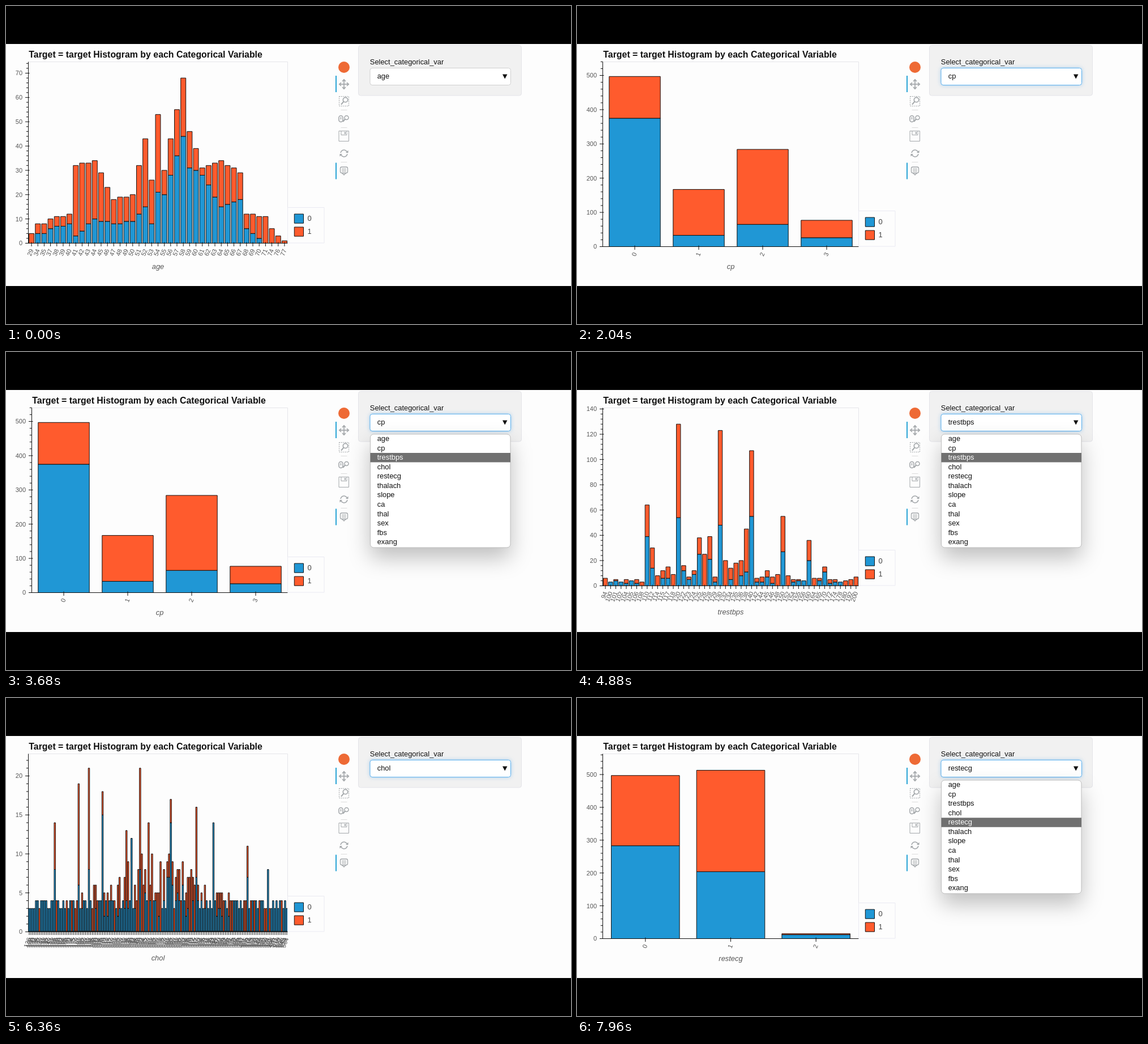
Write an HTML page with a canvas that moves like this. It is 998x561 px and loops after 8000 ms.

```html
<!DOCTYPE html>
<html lang="en">
<head>
<meta charset="utf-8">
<title>Categorical histogram</title>
<style>
html, body { margin: 0; width: 100%; height: 100%; overflow: hidden; background: #000; }
canvas { display: block; }
</style>
</head>
<body>
<canvas id="stage" width="998" height="561"></canvas>
<script>
const ctx = document.getElementById('stage').getContext('2d');
const FONT = '"Liberation Sans", Arial, sans-serif';
const BLUE = '#2097d5', ORANGE = '#ff5b2d', ICON = '#a3a7aa';
const LOOP = 8000, RIGHT = 497.5, TOP = 98.5;
const OPTIONS = ['age', 'cp', 'trestbps', 'chol', 'restecg', 'thalach', 'slope', 'ca', 'thal', 'sex', 'fbs', 'exang'];

// [start ms, charted variable, highlighted option while the menu is open]
const TIMELINE = [
  [0, 'age'], [1080, 'age', 'age'], [1640, 'age', 'cp'], [1840, 'age'],
  [2040, 'cp'], [2640, 'cp', 'cp'], [3440, 'cp', 'trestbps'], [4000, 'cp'],
  [4080, 'trestbps'], [4800, 'trestbps', 'trestbps'], [5360, 'trestbps', 'chol'], [5640, 'trestbps'],
  [5800, 'chol'], [6440, 'chol', 'chol'], [6880, 'chol', 'restecg'], [7200, 'chol'],
  [7360, 'restecg'], [7840, 'restecg', 'restecg']
];
const FOCUS_AT = 1080;

const range = (from, to) => Array.from({ length: to - from + 1 }, (_, i) => from + i);
const random = n => { const v = Math.sin(n * 12.9898 + 4) * 43758.5453; return v - Math.floor(v); };
const bell = (x, center, width) => Math.exp(-(((x - center) / width) ** 2));

// Straight lines through key points [x, total, zeros].
function interpolate(keys, x) {
  const next = Math.max(1, keys.findIndex(key => key[0] >= x));
  const a = keys[next - 1], b = keys[next], share = (x - a[0]) / (b[0] - a[0]);
  return [1, 2].map(k => Math.round(a[k] + (b[k] - a[k]) * share));
}

// Tall bars [x, total, zeros] standing above a seeded floor of the given height.
function scatter(peaks, x, height) {
  const peak = peaks.find(p => p[0] === x);
  if (peak) return peak.slice(1);
  const total = 3 + Math.round(height * random(x)), split = random(x + 500);
  const zeros = split < 0.35 ? 0 : total < 5 ? total : Math.round(total * split * 0.8);
  return [total, zeros];
}

function ageChart() {
  const keys = [[29, 4, 0], [40, 12, 8], [41, 32, 3], [44, 34, 10], [47, 18, 8], [50, 20, 9], [52, 43, 15],
    [53, 26, 8], [54, 53, 21], [55, 30, 20], [58, 68, 44], [59, 46, 31], [61, 31, 28], [64, 34, 15],
    [67, 29, 18], [68, 12, 6], [71, 11, 0], [77, 1, 0]];
  const labels = [29, 34, 35, ...range(37, 71), 74, 76, 77];
  return { left: 39.5, base: 418, unit: 300 / 70, major: 10, minor: 2, labels,
    bars: labels.map(age => interpolate(keys, age)) };
}

function pressureChart() {
  const irregular = [101, 116, 117, 123, 129, 158, 162, 166, 168, 175, 176];
  const peaks = [[110, 64, 39], [112, 30, 14], [120, 128, 54], [125, 38, 25], [128, 39, 21], [130, 123, 48],
    [138, 45, 11], [140, 107, 55], [150, 55, 27], [160, 36, 20], [170, 15, 11]];
  const regular = n => n % 2 === 0 || n % 5 === 0;
  const labels = [94, ...range(100, 180).filter(n => regular(n) !== irregular.includes(n)), 192, 200];
  return { left: 45.5, base: 412, unit: 312 / 140, major: 20, minor: 4, labels,
    bars: labels.map(n => scatter(peaks, n, 4 + 18 * bell(n, 128, 16))) };
}

function cholesterolChart() {
  const peaks = [[15, 14, 8], [29, 19, 6], [35, 21, 8], [43, 18, 15], [57, 13, 4], [60, 12, 12], [65, 21, 8],
    [70, 14, 0], [83, 17, 14], [98, 16, 7], [108, 14, 14], [128, 11, 7], [140, 8, 8]];
  const indices = range(0, 151);
  return { left: 39.5, base: 412, unit: 13.75, major: 5, minor: 1,
    labels: indices.map(i => Math.round(126 + i * 1.9 + (i / 151) ** 8 * 151)),
    bars: indices.map(i => scatter(peaks, i, 0.6 + 7 * bell(i, 73, 48) ** 2)) };
}

const charts = {
  age: ageChart(),
  cp: { left: 45.5, base: 424, unit: 0.604, major: 100, minor: 20,
    labels: range(0, 3), bars: [[497, 375], [167, 33], [284, 65], [77, 26]] },
  trestbps: pressureChart(),
  chol: cholesterolChart(),
  restecg: { left: 45.5, base: 424, unit: 0.579, major: 100, minor: 20,
    labels: range(0, 2), bars: [[497, 283], [513, 204], [15, 12]] }
};

function text(string, x, y, size, { color = '#111', align = 'left', style = '', angle = 0 } = {}) {
  ctx.save();
  ctx.translate(x, y);
  ctx.rotate(angle);
  ctx.font = `${style} ${size}px ${FONT}`;
  ctx.fillStyle = color;
  ctx.textAlign = align;
  ctx.fillText(string, 0, size * 0.36);
  ctx.restore();
}

function line(color, width, ...points) {
  ctx.beginPath();
  points.forEach(([x, y]) => ctx.lineTo(x, y));
  ctx.strokeStyle = color;
  ctx.lineWidth = width;
  ctx.stroke();
}

function box(x, y, w, h, fill, stroke, radius = 0) {
  ctx.beginPath();
  ctx.roundRect(x, y, w, h, radius);
  if (fill) { ctx.fillStyle = fill; ctx.fill(); }
  if (stroke) { ctx.strokeStyle = stroke; ctx.lineWidth = 1; ctx.stroke(); }
}

function shadowed(color, blur, offsetY, draw) {
  ctx.save();
  ctx.shadowColor = color;
  ctx.shadowBlur = blur;
  ctx.shadowOffsetY = offsetY;
  draw();
  ctx.restore();
}

function drawChart(name) {
  const { left, base, unit, major, minor, labels, bars } = charts[name];
  const floor = base + 0.5, pitch = (RIGHT - left) / labels.length, barWidth = pitch * 0.8;
  const yOf = value => floor - value * unit;

  line('#e6e6ea', 1, [left, TOP], [RIGHT, TOP], [RIGHT, floor]);
  text('Target = target Histogram by each Categorical Variable', left + 0.8, 85.5, 15.9, { style: 'bold' });

  bars.forEach(([total, zeros], i) => {
    const center = left + (i + 0.5) * pitch, x = center - barWidth / 2;
    const bar = (from, to, fill) => to > from && box(x, yOf(to), barWidth, (to - from) * unit, fill, '#111');
    bar(0, zeros, BLUE);
    bar(zeros, total, ORANGE);
    line('#111', 1, [center, floor - 2], [center, floor + 5.5]);
    text(labels[i], center, floor + 10.5, 11, { color: '#555', align: 'right', angle: -1.2 });
  });

  line('#111', 1, [left, TOP], [left, floor], [RIGHT, floor]);
  for (let value = 0; yOf(value) >= TOP - 0.5; value += minor) {
    const isMajor = value % major === 0, y = yOf(value);
    line('#111', 1, [left - (isMajor ? 5.5 : 3.7), y], [left + (isMajor ? 2 : 0), y]);
    if (isMajor) text(value, left - 10.5, y, 11, { color: '#555', align: 'right' });
  }
  text(name, (left + RIGHT) / 2, base < 415 ? 458 : 459.5, 12.9, { color: '#555', align: 'center', style: 'italic' });

  box(RIGHT, base - 62.5, 64.5, 62.5, null, '#eaeaf2');
  [BLUE, ORANGE].forEach((color, i) => {
    const y = base - 51 + i * 23;
    box(509.3, y, 16.2, 16.2, color, '#111');
    text(i, 532.5, y + 7, 12.9, { color: '#444' });
  });
}

function magnifier(x, y, r) {
  ctx.beginPath();
  ctx.arc(x, y, r, 0, 7);
  ctx.stroke();
  line(ICON, 2, [x - r * 0.7, y + r * 0.7], [x - r * 1.8, y + r * 2]);
}

function drawToolbar() {
  ctx.fillStyle = '#ee6a35';
  ctx.beginPath();
  ctx.arc(597, 108, 10, 0, 7);
  ctx.fill();
  for (const y of [123, 276.5]) box(582, y, 2, 29, '#29a5d6');
  for (const y of [183.5, 214.5, 275.5]) line('#dcdcdc', 1, [591.5, y], [602.5, y]);

  // pan
  ctx.save();
  ctx.translate(597, 138);
  for (let i = 0; i < 4; i++) {
    line(ICON, 1.7, [0, 0], [0, -8]);
    line(ICON, 1.7, [-3, -5], [0, -8.2], [3, -5]);
    ctx.rotate(Math.PI / 2);
  }
  ctx.restore();

  // box zoom
  ctx.setLineDash([2, 1.5]);
  box(588.5, 159.5, 17, 17, null, ICON);
  ctx.setLineDash([]);
  ctx.lineWidth = 1.7;
  magnifier(599.5, 165.5, 4.2);

  // wheel zoom
  ctx.lineWidth = 1.6;
  ctx.beginPath();
  ctx.roundRect(588, 193.5, 7, 11, 3.5);
  ctx.stroke();
  line(ICON, 1.5, [591.5, 196], [591.5, 200]);
  magnifier(601.5, 197, 3.5);

  // save
  box(588, 220.5, 17.5, 18, null, ICON);
  box(592, 220.5, 10, 7, null, ICON);
  box(598, 222, 2, 4, ICON);

  // reset
  for (const turn of [0, Math.PI]) {
    ctx.save();
    ctx.translate(597, 260);
    ctx.rotate(turn);
    ctx.lineWidth = 1.6;
    ctx.beginPath();
    ctx.arc(0, 0, 6, Math.PI * 1.05, Math.PI * 1.85);
    ctx.stroke();
    ctx.fillStyle = ICON;
    ctx.beginPath();
    ctx.moveTo(7.5, -5.5);
    ctx.lineTo(7.5, -1);
    ctx.lineTo(3, -1);
    ctx.fill();
    ctx.restore();
  }

  // hover
  ctx.lineWidth = 1.3;
  ctx.beginPath();
  ctx.roundRect(590.5, 284, 13, 10.5, 2.5);
  ctx.stroke();
  for (const y of [287, 289.3, 291.6]) line(ICON, 0.9, [593, y], [601, y]);
  line(ICON, 1.5, [593.5, 294.5], [597, 298], [600.5, 294.5]);
}

function drawSelect(value, focused) {
  const field = [643, 109.5, 248.5, 30];
  box(622.5, 69.5, 288, 88.5, '#f1f1f1', '#e4e4e9', 4);
  text('Select_categorical_var', 642.8, 98.5, 12.9);
  if (focused) shadowed('rgba(102,175,233,.6)', 7, 0, () => box(...field, '#fff', null, 4));
  box(...field, '#fff', focused ? '#5cb0ee' : '#cfcfcf', 4);
  text(value, 655.7, 123.5, 12.9);
  ctx.fillStyle = '#111';
  ctx.beginPath();
  ctx.moveTo(877, 120.5);
  ctx.lineTo(885.5, 120.5);
  ctx.lineTo(881.2, 128.5);
  ctx.fill();
}

function drawMenu(highlighted) {
  const rowHeight = 16.59, frame = [643.5, 145, 247.5, 200];
  shadowed('rgba(0,0,0,.25)', 38, 18, () => box(...frame, '#fff', null, 6));
  box(...frame, '#fff', '#bdbdbd', 6);
  OPTIONS.forEach((option, i) => {
    const top = 144.8 + i * rowHeight, active = option === highlighted;
    if (active) box(643.5, top, 247.5, rowHeight, '#707070');
    text(option, 655.7, top + 7.5, 12.9, { color: active ? '#fff' : '#111' });
  });
}

function render(now) {
  const time = now % LOOP;
  const [, variable, highlighted] = TIMELINE.filter(([start]) => start <= time).pop();
  box(0, 0, 998, 561, '#000');
  box(0, 67, 998, 427, '#fdfdfd');
  drawChart(variable);
  drawToolbar();
  drawSelect(variable, time >= FOCUS_AT);
  if (highlighted) drawMenu(highlighted);
  requestAnimationFrame(render);
}
requestAnimationFrame(render);
</script>
</body>
</html>
```
